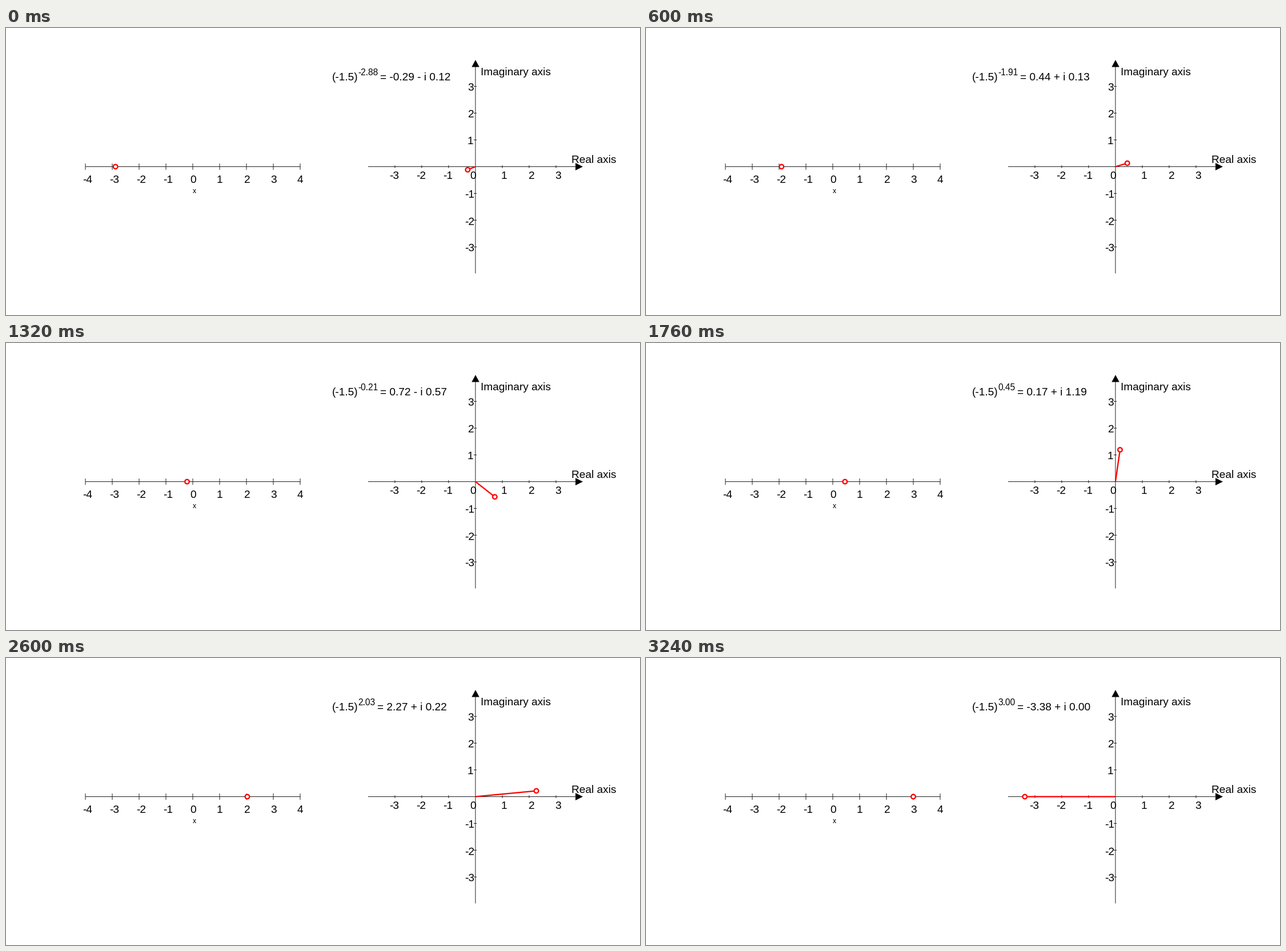
Write a matplotlib script that moves like this. It is 1110 px wide and 504 px high and loops after 3.74 s.

```python
import math

import matplotlib.pyplot as plt
import numpy as np
from matplotlib.animation import FuncAnimation
from matplotlib.patches import Circle, Polygon

W, H, DPI = 1110, 504, 100
PT = 72 / DPI                      # points per pixel
UNIT = 47                          # pixels per axis unit
X0, PLANE_X, AXIS_Y = 327, 821.9, 243.5
BASE = -1.5
INTERVAL, TICKS, LAST = 20, 187, 81

# Pace of the exponent over 100 even samples of -3..3, with its quick skips.
PACE_STEP = [0, 14, 15, 28, 30, 31, 44, 56, 57, 58, 81]
PACE_SAMPLE = [2, 16, 18, 36, 38, 44, 57, 73, 74, 76, 99]

plt.rcParams["font.family"] = "Liberation Sans"
plt.rcParams["text.hinting"] = "no_autohint"

fig = plt.figure(figsize=(W / DPI, H / DPI), dpi=DPI, facecolor="white")
ax = fig.add_axes([0, 0, 1, 1])
ax.set_xlim(0, W)
ax.set_ylim(H, 0)
ax.axis("off")


def label(x, y, text, size=19):
    return ax.text(x, y, text, fontsize=size * PT, color="black",
                   ha="left", va="baseline")


def rule(x1, y1, x2, y2):
    ax.plot([x1, x2], [y1, y2], color="#202020", lw=PT, snap=False,
            solid_capstyle="butt")


def ring():
    return ax.add_patch(Circle((0, 0), 3.8, fc="white", ec="red",
                               lw=2.3 * PT, zorder=5, snap=False))


def number_line():
    rule(139, AXIS_Y, 515.5, AXIS_Y)
    for n in range(-4, 5):
        x = X0 + n * UNIT
        rule(x, 238, x, 249)
        label(x - 5, 272, str(n))
    label(327, 290, "x", 12.5)


def plane():
    cx = PLANE_X
    rule(634, AXIS_Y, 998, AXIS_Y)
    rule(cx, 68, cx, 431)
    for tri in ([(822, 56), (815.3, 68.5), (828.7, 68.5)],
                [(1010, 243.5), (997, 237), (997, 250)]):
        ax.add_patch(Polygon(tri, fc="black", ec="none"))
    for n in (-3, -2, -1, 1, 2, 3):
        x, y = cx + n * UNIT, AXIS_Y - n * UNIT
        rule(x, 241, x, 246)
        rule(819, y, 824, y)
        label(x - (10 if n < 0 else 2), 265, str(n))
        label(803 if n < 0 else 808, y + (8 if n < 0 else 7.5), str(n))
    label(812, 265, "0")
    label(831, 83, "Imaginary axis")
    label(990, 237, "Real axis")


number_line()
plane()
label(570.6, 92, "(-1.5)")
power = label(616, 82.6, "", 15.5)
value = label(655, 92, "")
arm, = ax.plot([], [], color="red", lw=2.3 * PT, zorder=4, snap=False,
               solid_capstyle="butt")
slider, tip = ring(), ring()


def draw(i):
    step = min(i * INTERVAL // 40, LAST)
    sample = round(float(np.interp(step, PACE_STEP, PACE_SAMPLE)))
    x = -3 + 6 * sample / 99
    size = abs(BASE) ** x
    re, im = size * math.cos(math.pi * x), size * math.sin(math.pi * x)

    px, py = PLANE_X + UNIT * re, AXIS_Y - UNIT * im
    slider.center = X0 + UNIT * x, AXIS_Y
    tip.center = px, py
    arm.set_data([PLANE_X, px], [AXIS_Y, py])

    power.set_text(f"{x:.2f}")
    value.set_text(f"= {re:.2f} {'+' if im >= 0 else '-'} i {abs(im):.2f}")
    value.set_x(655 if x < 0 else 650)
    return slider, tip, arm, power, value


anim = FuncAnimation(fig, draw, frames=TICKS, interval=INTERVAL,
                     repeat=True, repeat_delay=0, blit=False)
plt.show()
```
